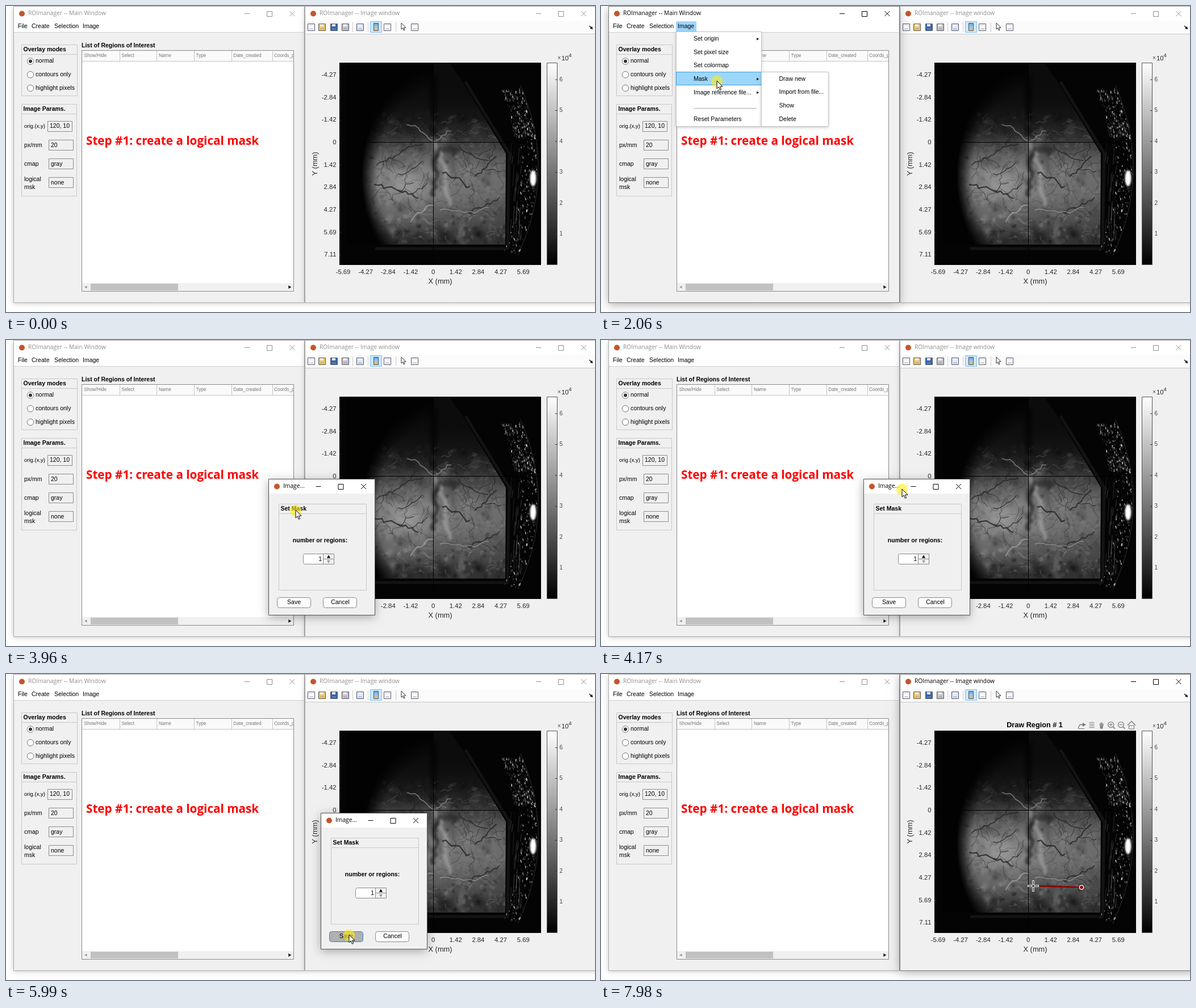
An HTML page with a canvas for the animation above (8 s loop, 1037 by 540 pixels).

```html
<!DOCTYPE html>
<html lang="en">
<head>
<meta charset="utf-8">
<title>Creating a logical mask</title>
<style>
html, body { margin: 0; width: 100%; height: 100%; overflow: hidden; background: #fff; }
canvas { display: block; }
</style>
</head>
<body>
<canvas id="stage" width="1037" height="540"></canvas>
<script>
const LOOP = 8000;
const SANS = '"Liberation Sans", Arial, sans-serif';
const HUMAN = '"Open Sans", "Noto Sans", sans-serif';
const stage = document.getElementById('stage').getContext('2d');
let g = stage;

// ---------- helpers ----------
function text(s, x, y, { size = 10.5, weight = '', color = '#000', font = SANS, align = 'left' } = {}) {
  g.font = `${weight} ${size}px ${font}`;
  g.fillStyle = color;
  g.textAlign = align;
  g.textBaseline = 'middle';
  g.fillText(s, x, y);
}
const bold = (s, x, y, more) => text(s, x, y, { weight: 'bold', ...more });

function box(x, y, w, h, fill, stroke, radius = 0) {
  g.beginPath();
  g.roundRect(x + (stroke ? .5 : 0), y + (stroke ? .5 : 0), w, h, radius);
  if (fill) { g.fillStyle = fill; g.fill(); }
  if (stroke) { g.strokeStyle = stroke; g.lineWidth = 1; g.stroke(); }
}
function line(color, width, ...p) {
  g.beginPath();
  for (let i = 0; i < p.length; i += 2) g.lineTo(p[i], p[i + 1]);
  g.strokeStyle = color; g.lineWidth = width; g.stroke();
}
function blob(x, y, rx, ry, fill, turn = 0) {
  g.beginPath(); g.ellipse(x, y, rx, ry, turn, 0, 7);
  g.fillStyle = fill; g.fill();
}
function ring(x, y, r, fill, stroke, width = 1) {
  blob(x, y, r, r, fill);
  g.strokeStyle = stroke; g.lineWidth = width; g.stroke();
}
// Small triangle pointing along the given angle
function wedge(x, y, r, angle, fill) {
  g.beginPath();
  for (let i = 0; i < 3; i++) g.lineTo(x + r * Math.cos(angle + i * 2.094), y + r * Math.sin(angle + i * 2.094));
  g.fillStyle = fill; g.fill();
}
function shades(gradient, ...colors) {
  colors.forEach((c, i) => gradient.addColorStop(i / (colors.length - 1), c));
  return gradient;
}
function shadowed(blur, alpha, drop, paint) {
  g.save();
  g.shadowColor = `rgba(0,0,0,${alpha})`;
  g.shadowBlur = blur; g.shadowOffsetY = drop;
  paint();
  g.restore();
}
const grey = (v, a = 1) => `rgba(${v},${v},${v},${a})`;

let seed = 11;
const rnd = (a = 1, b = 0) => {
  seed = (seed * 1664525 + 1013904223) >>> 0;
  return b + (a - b) * seed / 4294967296;
};

// Position on a path of [time, x, y] points
function along(path, t) {
  const i = path.findIndex(p => p[0] > t);
  if (i < 0) return path.at(-1).slice(1);
  if (i === 0) return path[0].slice(1);
  const [t0, x0, y0] = path[i - 1], [t1, x1, y1] = path[i];
  const u = (t - t0) / (t1 - t0), k = u * u * (3 - 2 * u);
  return [x0 + (x1 - x0) * k, y0 + (y1 - y0) * k];
}

// ---------- microscope picture ----------
// Wandering vessel that throws off thinner branches
function vessel(x, y, angle, steps, width, color, branching = .2) {
  const p = [x, y];
  for (let i = 0; i < steps; i++) {
    const bend = angle + rnd(.8, -.8);
    p.push(x += 7 * Math.cos(bend), y += 7 * Math.sin(bend));
    if (width > .7 && rnd() < branching) vessel(x, y, angle + (rnd() < .5 ? .9 : -.9), 5, width * .55, color);
  }
  g.lineJoin = 'round';
  line(color, width, ...p);
}

function mottle(count, size, alpha) {
  for (let i = 0; i < count; i++) {
    const y = rnd(420, 190);
    blob(rnd(885, 635), y, rnd(size, 1), rnd(size * .7, 1), grey(rnd() < .6 ? 0 : 175, rnd(y > 365 ? alpha * 1.6 : alpha)), rnd(3));
  }
}

function paintPhoto() {
  const canvas = new OffscreenCanvas(1037, 540);
  g = canvas.getContext('2d');
  g.beginPath(); g.rect(587, 100, 355, 357); g.clip();

  // tissue is brightest halfway down, most of all on the left
  const glow = y => 12 + 92 * Math.exp(-(((y - 300) / (y < 300 ? 72 : 125)) ** 2));
  const levels = Array.from({ length: 20 }, (_, i) => grey(glow(110 + i * 311 / 19) | 0));
  box(587, 100, 355, 357, shades(g.createLinearGradient(0, 110, 0, 421), ...levels));
  for (const [x, r, a] of [[705, 90, .3], [812, 85, .1]])
    box(587, 100, 355, 357, shades(g.createRadialGradient(x, 318, 5, x, 318, r), grey(255, a), grey(255, a / 2), grey(255, 0)));

  g.filter = 'blur(3px)';
  mottle(160, 15, .22);
  g.filter = 'blur(.6px)';
  mottle(900, 6, .13);
  for (let i = 0; i < 50; i++)
    vessel(rnd(860, 650), i % 2 ? rnd(235, 205) : rnd(412, 362), rnd(.5, -.5), 3, rnd(2.2, .8), grey(165, rnd(.32)), 0);

  // midline
  g.filter = 'blur(2px)';
  box(745, 120, 15, 110, grey(0, .4));
  vessel(752, 238, 1.57, 18, 7, grey(180, .5), 0);
  vessel(764, 250, 1.57, 14, 7, grey(20, .6), 0);
  blob(784, 254, 16, 6, grey(20, .4));

  // main vessels: x, y, heading, steps, width
  g.filter = 'blur(.5px)';
  const dark = grey(28, .72);
  [[648, 315, .42, 13, 2.4], [652, 281, -.4, 14, 1.5], [690, 296, -.2, 7, 1.4],
   [768, 295, .25, 9, 2.4], [825, 301, -.45, 8, 2], [797, 245, .75, 9, 1.6],
   [812, 364, -.5, 10, 1.6]].forEach(v => vessel(...v, dark, .15));
  for (let i = 0; i < 34; i++)
    vessel(i % 2 ? rnd(865, 775) : rnd(735, 655), rnd(350, 245), rnd(6.3), 5, rnd(1.2, .6), grey(28, .42));
  [[712, 382, -.55, 8, 2.4], [757, 237, -.7, 5, 1.6], [751, 238, -2.6, 8, 1.8], [764, 360, .2, 13, 1.6]]
    .forEach(v => vessel(...v, grey(185, .5), 0));
  g.filter = 'none';

  // soft dark rim on the left, hard holder edge on the right
  g.save();
  g.beginPath(); g.rect(587, 100, 165, 357); g.clip();
  g.translate(762, 300); g.scale(136, 190);
  box(-3, -3, 6, 6, shades(g.createRadialGradient(0, 0, .8, 0, 0, 1), grey(2, 0), grey(2, .5), grey(2)));
  g.restore();
  g.beginPath();
  g.rect(587, 100, 355, 357);
  for (const [x, y] of [[600, 421], [879, 421], [880, 260], [806, 137], [780, 100], [600, 100]])
    x === 600 && y === 421 ? g.moveTo(x, y) : g.lineTo(x, y);
  g.fillStyle = '#040404'; g.fill('evenodd');
  line('#131313', 5, 809, 134, 886, 260, 883, 428, 650, 428);

  // reflections outside the holder
  const arc = y => 937 - .0015 * (y - 285) ** 2;
  for (let y = 140; y < 440; y += 4) line('#262626', 1.2, arc(y), y, arc(y + 4), y + 4);
  for (let i = 0; i < 420; i++) {
    const cluster = i < 230, y = cluster ? rnd(232, 145) : rnd(435, 200);
    const x = arc(y) - rnd(cluster ? 38 : 30);
    line(grey(30 + 190 * rnd() ** 2.5 | 0), rnd(2, .6), x, y, x + rnd(2, -1), y + rnd(5, 1));
  }
  for (let i = 0; i < 26; i++) {
    const x = rnd(908, 889), y = rnd(400, 240);
    line(grey(120, rnd(.55)), 1.2, x, y, x - 2, y + rnd(40, 10));
  }
  g.filter = 'blur(1.5px)';
  blob(928, 304, 5.5, 14, '#fff');
  g.filter = 'none';

  line('#000', 1, 752.5, 100, 752.5, 457);
  line('#000', 1, 587, 240.5, 942, 240.5);
  g = stage;
  return canvas;
}
const photo = paintPhoto();

// ---------- windows ----------
function windowFrame(x, y, w, h, title, active, closeX, border = active ? '#777' : '#aaa') {
  shadowed(active ? 16 : 9, active ? .32 : .2, active ? 4 : 2, () => box(x, y, w, h, '#f0f0f0'));
  box(x, y, w, 26, '#fff');
  box(x, y, w, h, null, border);
  const ink = active ? '#000' : '#8f8f8f', cy = y + 13.5;
  blob(x + 15, cy, 5, 5, '#c4552d');
  text(title, x + 26, cy, { size: 10.25, color: ink, font: HUMAN });
  line(ink, 1, closeX - 84, cy, closeX - 75, cy);
  box(closeX - 45, y + 9, 9, 9, null, ink);
  for (const d of [4.5, -4.5]) line(ink, 1, closeX - 4.5, cy - d, closeX + 4.5, cy + d);
}
function panel(x, y, w, h, title) {
  box(x, y, w, h, null, '#c8c8c8');
  line('#c8c8c8', 1, x, y + 17.5, x + w, y + 17.5);
  bold(title, x + 3.5, y + 9);
}

function mainWindow(active) {
  windowFrame(13, 0, 512, 523, 'ROImanager -- Main Window', active, 504);
  box(14, 26, 510, 20, '#fff');
  line('#d0d0d0', 1, 14, 46.5, 525, 46.5);
  Object.entries({ File: 21, Create: 45, Selection: 85, Image: 135 }).forEach(([s, x]) => text(s, x, 36));

  panel(27, 68, 98, 90, 'Overlay modes');
  ['normal', 'contours only', 'highlight pixels'].forEach((s, i) => {
    const y = 97.5 + i * 23.7;
    ring(43, y, 5.7, '#fff', '#777');
    if (!i) blob(43, y, 3, 3, '#333');
    text(s, 52, y);
  });

  panel(27, 173, 97, 162, 'Image Params.');
  Object.entries({ 'orig.(x,y)': '120, 10', 'px/mm': '20', cmap: 'gray', 'logical msk': 'none' }).forEach(([label, value], i) => {
    const y = 212.5 + i * 33.2, x = i ? 75 : 73, words = label.split(' ');
    words.forEach((s, k) => text(s, 32, y + (k * 2 - words.length + 1) * 6 + (k ? 2 : 0), { size: i ? 10.5 : 9.5 }));
    box(x, y - 9.5 | 0, 43, 18, '#f0f0f0', '#8c8c8c');
    text(value, x + 4, y);
  });

  bold('List of Regions of Interest', 133, 70);
  box(133, 78, 373, 425, '#fff', '#8a8a8a');
  box(134, 79, 372, 18, '#fafafa');
  line('#c4c4c4', 1, 134, 97.5, 506, 97.5);
  g.save();
  g.beginPath(); g.rect(134, 79, 372, 18); g.clip();
  ['Show/Hide', 'Select', 'Name', 'Type', 'Date_created', 'Coords_px'].forEach((s, i) => {
    const x = 137.5 + i * 65.7 + (i > 4 ? 6 : 0);
    text(s, x, 88, { size: 8.2, color: '#757575' });
    if (i) line('#c4c4c4', 1, (x | 0) - 2.5, 79, (x | 0) - 2.5, 97);
  });
  g.restore();
  box(134, 489, 372, 14, '#f0f0f0');
  box(149, 490, 154, 12, '#c1c1c1');
  wedge(141, 496, 3, Math.PI, '#999');
  wedge(499, 496, 3.5, 0, '#222');
  bold('Step #1: create a logical mask', 141, 240, { size: 20.7, color: '#f00', font: HUMAN });
}

function toolbar() {
  box(527, 26, 510, 23, '#fbfbfb');
  line('#c9c9c9', 1, 527, 49.5, 1037, 49.5);
  for (const x of [610, 637, 686]) line('#cfcfcf', 1, x + .5, 29, x + .5, 46);
  box(641, 27, 20, 19, '#cce8ff', '#7fc0ee');
  const icon = (x, fill) => {
    box(x - 6, 31, 12, 12, fill, '#556');
    box(x - 3, 32, 6, 4, '#eef');
    line('#99a', 1, x - 3, 40.5, x + 4, 40.5);
  };
  Object.entries({ 537: '#fff', 556: '#f2c65a', 577: '#3567b0', 597: '#c4c4c4', 623: '#dce8f8', 671: '#fff', 719: '#fff' })
    .forEach(([x, fill]) => icon(+x, fill));
  box(647, 30, 8, 13, shades(g.createLinearGradient(0, 30, 0, 43), '#5b9be0', '#9ec7e6', '#f0b860'), '#456');
  arrow(696, 30, .8);
  line('#000', 1.2, 1027, 35, 1032, 40);
  wedge(1031, 39, 3, Math.PI / 4, '#000');
}

// Share, note, pan, zoom in, zoom out and home
function axesTools() {
  const c = '#777', y = 90.5;
  for (let i = 0; i < 6; i++) {
    const x = 846 + i * 17.6;
    if (i === 0) { line(c, 1.3, x - 6, y + 5, x - 3, y - 1, x + 4, y - 1); wedge(x + 4, y - 1, 4, 0, c); line(c, 1, x - 6, y + 6, x + 5, y + 6); }
    if (i === 1) for (let k = -5; k < 7; k += 3) line(c, 1, x - 4, y + k, x + 5, y + k);
    if (i === 2) for (let k = -3; k < 5; k += 2) line(c, 1.3, x + k, y - 6 + Math.abs(k), x + k / 2, y + 6);
    if (i === 3 || i === 4) {
      ring(x - 1, y - 1, 5, '#f0f0f0', c, 1.2);
      line(c, 1.6, x + 3, y + 3, x + 6, y + 6);
      line(c, 1, x - 4, y - 1, x + 2, y - 1);
      if (i === 3) line(c, 1, x - 1, y - 4, x - 1, y + 2);
    }
    if (i === 5) { line(c, 1.3, x - 7, y, x, y - 7, x + 7, y); box(x - 5, y, 9, 6, null, c); }
  }
}

function imageWindow(active, drawing, hover) {
  windowFrame(526, 0, 520, 523, 'ROImanager -- Image window', active, 1017);
  toolbar();
  g.drawImage(photo, 0, 0);
  const tick = { size: 11.3, color: '#262626' }, label = { ...tick, size: 12.8, align: 'center' };
  const mm = n => n ? (n * 64 / 45).toFixed(2) : '0';
  for (let i = 0; i < 9; i++) {
    const p = i * 39.65;
    text(mm(i - 3), 581.5, 122 + p, { ...tick, align: 'right' });
    text(mm(i - 4), 593.5 + p, 469.5, { ...tick, align: 'center' });
    line('#333', 1, 587, 122 + p, 590, 122 + p);
  }
  text('X (mm)', 764.5, 486, label);
  g.save();
  g.translate(544, 278.5); g.rotate(-Math.PI / 2);
  text('Y (mm)', 0, 0, label);
  g.restore();

  box(952, 100, 18, 356, shades(g.createLinearGradient(0, 100, 0, 456), '#fff', '#000'), '#555');
  for (let i = 1; i < 7; i++) {
    const y = 457 - i * 54.5;
    line('#333', 1, 967, y, 970, y);
    text(i, 974.5, y, { size: 10, color: '#444' });
  }
  text('×', 971, 92.5, { size: 10, color: '#444' });
  text('10', 978, 92.5, tick);
  text('4', 990.5, 87, { ...tick, size: 9.5 });
  if (drawing) bold('Draw Region # 1', 763.5, 90.5, { size: 12.7, align: 'center' });
  if (hover) axesTools();
}

function menu(submenu, drawNew) {
  const popup = (x, y, w, h) => {
    shadowed(5, .25, 2, () => box(x, y, w, h, '#fff'));
    box(x, y, w, h, null, '#c4c4c4');
  };
  const lit = '#9dd6fb', row = 23.6;
  box(132, 27, 36, 18, lit);
  text('Image', 135, 36);
  popup(132, 45, 150, 167);
  if (submenu) {
    box(132, 116, 150, 23, lit, '#3f9bd8');
    popup(282, 116, 118, 96);
    if (drawNew) box(283, 117, 116, 22, lit, '#3f9bd8');
    ['Draw new', 'Import from file...', 'Show', 'Delete'].forEach((s, i) => text(s, 313.5, 129 + i * row));
  }
  ['Set origin', 'Set pixel size', 'Set colormap', 'Mask', 'Image reference file...', '', 'Reset Parameters'].forEach((s, i) => {
    const y = 58.3 + i * row;
    text(s, 163, y);
    if ([0, 3, 4].includes(i)) wedge(275.5, y, 2.6, 0, '#000');
    if (!s) line('#aaa', 1, 163, 180.5, 274, 180.5);
  });
}

function dialog(x, pressed) {
  windowFrame(x, 245, 187, 240, 'Image...', true, x + 167.5, '#555');
  panel(x + 18, 289, 154, 152, 'Set Mask');
  bold('number or regions:', x + 91, 354, { align: 'center' });
  box(x + 61, 377, 54, 18, '#fff', '#888', 3);
  box(x + 96, 377, 19, 9, '#f2f2f2', '#888');
  box(x + 96, 386, 19, 9, '#f2f2f2', '#888');
  wedge(x + 106, 383, 3.5, -Math.PI / 2, '#000');
  wedge(x + 106, 390.5, 3.5, Math.PI / 2, '#999');
  text('1', x + 94, 387, { align: 'right' });
  ['Save', 'Cancel'].forEach((s, i) => {
    const down = pressed && !i;
    box(x + 15 + i * 81.5 | 0, 454, 59, 18, down ? '#b0b0b0' : '#fcfcfc', down ? '#2a87d4' : '#8a8a8a', 4);
    text(s, x + 45 + i * 81.5, 463.5, { align: 'center' });
  });
}

// ---------- pointers ----------
function arrow(x, y, scale = 1) {
  g.save();
  g.translate(x, y); g.scale(scale, scale);
  g.beginPath();
  for (const [a, b] of [[0, 0], [0, 14], [3.2, 11], [5.4, 16.3], [7.6, 15.4], [5.4, 10.2], [10, 10.2]]) g.lineTo(a, b);
  g.closePath();
  g.fillStyle = '#fff'; g.fill();
  g.strokeStyle = '#000'; g.lineWidth = 1; g.stroke();
  g.restore();
}
function pointer([x, y], lit = true) {
  if (lit) blob(x, y + 1, 10.3, 10.3, 'rgba(255,236,20,.6)');
  arrow(x, y);
}
function crosshair([x, y]) {
  for (const [color, width, a, b] of [['#fff', 3.4, 2, 10], ['#111', 1.2, 3, 9]])
    for (const s of [1, -1]) {
      line(color, width, x + s * a, y, x + s * b, y);
      line(color, width, x, y + s * a, x, y + s * b);
    }
}

// ---------- timeline ----------
const toMenu = [[710, 290, 400], [1240, 150, 36], [1450, 150, 36], [2060, 204, 132], [2270, 330, 130], [2680, 300, 142]];
const toSave = [[3960, 510, 300], [4170, 530, 263], [4450, 622, 263], [4660, 607, 514], [5250, 607, 514], [5530, 604, 460]];
const toImage = [[6060, 604, 460], [6200, 613, 462], [6660, 846, 377]];
const drag = [[6730, 846, 377], [7150, 808, 363], [7510, 774, 373], [7770, 774, 373], [7980, 761, 374]];

function draw(t) {
  const within = (a, b) => t >= a && t < b;
  const drawing = t >= 6060, started = t >= 6730;
  const spot = along(started ? drag : toImage, t);
  const hover = drawing && spot[0] > 587 && spot[1] < 457;

  box(0, 0, 1037, 540, '#fff');
  if (within(1270, 2480)) {
    imageWindow(false);
    mainWindow(true);
  } else {
    mainWindow(false);
    imageWindow(drawing, drawing, hover);
  }

  if (within(1310, 2410)) menu(t >= 1980, t >= 2270);
  if (within(710, 2680)) pointer(along(toMenu, t));
  if (within(3960, 6060)) {
    const grip = along(toSave, Math.min(Math.max(t, 4170), 4450))[0];
    dialog(grip - 68, t >= 5500);
    pointer(along(toSave, t));
  }
  if (started) {
    line('#8b0000', 2.6, Math.min(846, spot[0] + 10), spot[1], 846, 376.5);
    ring(846, 376.5, 3.6, '#8b0000', '#fff', 1.4);
  }
  if (hover) crosshair(spot);
  else if (drawing) pointer(spot, false);
}

function tick() {
  draw(performance.now() % LOOP);
  requestAnimationFrame(tick);
}
tick();
</script>
</body>
</html>
```
